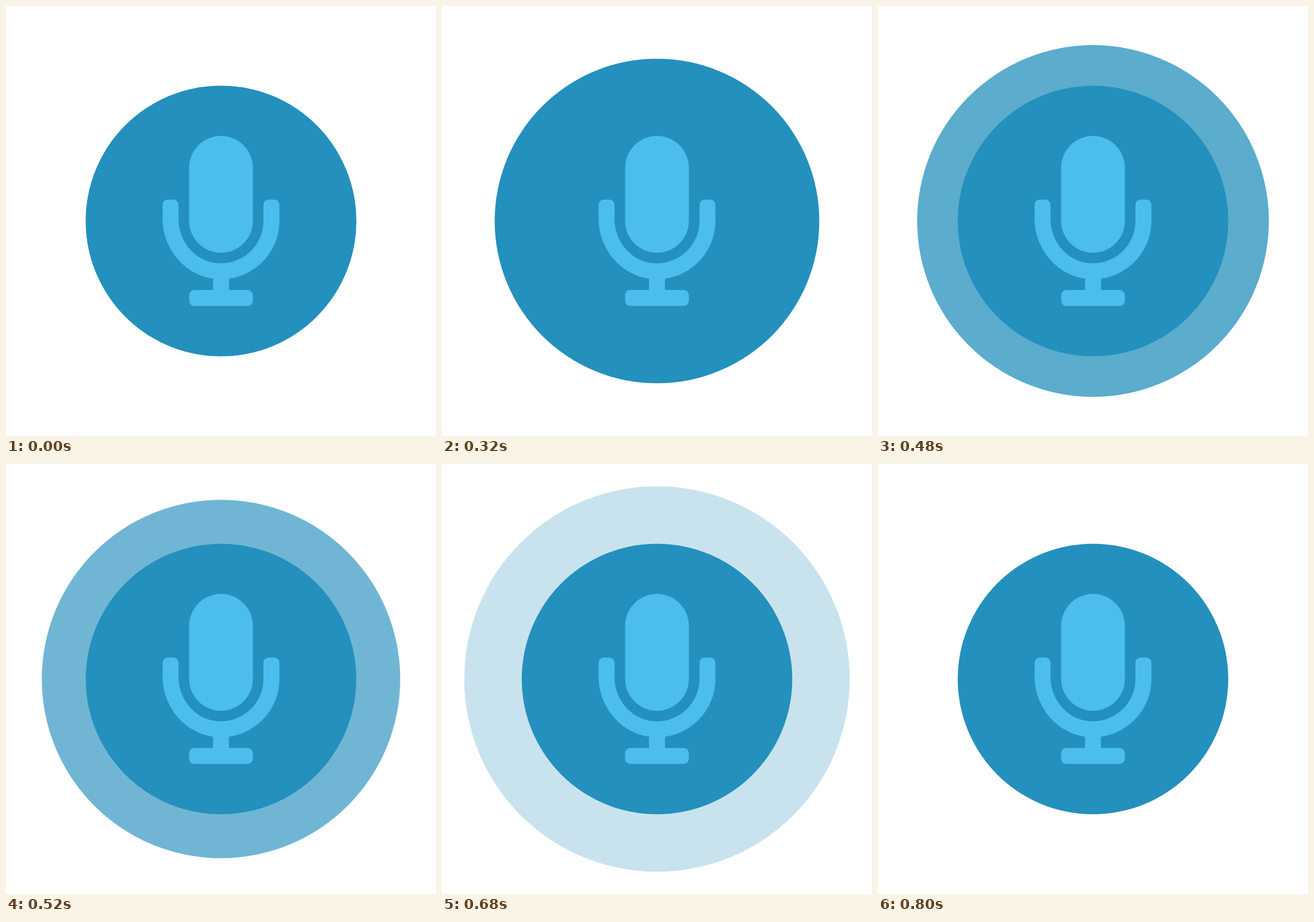
Animation, 748 px wide and 748 px high, one loop 1400 ms. Source, as an HTML page:

```html
<!DOCTYPE html>
<html lang="en">
<head>
<meta charset="utf-8">
<title>Microphone pulse</title>
<style>
  html, body { margin: 0; width: 100%; height: 100%; overflow: hidden; background: #fff; }
  svg { display: block; width: 100%; height: 100%; }
  .disc { fill: #2490bd; }
  .mic { fill: #4bbeee; }
</style>
</head>
<body>
<svg viewBox="0 0 748 748">
  <circle id="pulse" class="disc" cx="374" cy="374" r="235.3"/>
  <circle class="disc" cx="374" cy="374" r="235.3"/>
  <g class="mic" transform="translate(374 373.8) scale(.5775) translate(-176 -256)">
    <rect x="80" width="192" height="352" rx="96"/>
    <!-- cradle, stem and foot -->
    <path d="M336 192h-16c-8.84 0-16 7.16-16 16v48c0 74.8-64.49 134.82-140.79 127.38
             C96.71 376.89 48 317.11 48 250.3V208c0-8.84-7.16-16-16-16H16c-8.84 0-16 7.16-16 16v40.16
             c0 89.64 63.97 169.55 152 181.69V464H96c-8.84 0-16 7.16-16 16v16c0 8.84 7.16 16 16 16h160
             c8.84 0 16-7.16 16-16v-16c0-8.84-7.16-16-16-16h-56v-33.77
             C285.71 418.47 352 344.9 352 256v-48c0-8.84-7.16-16-16-16z"/>
  </g>
</svg>
<script>
  const LOOP = 1400, STEP = 40, END = 800;
  const FADE_START = 380, FADE_TIME = 400;
  const BASE_R = 235.3, GROWTH = 0.14706;
  const pulse = document.getElementById('pulse');

  function draw(now) {
    const t = Math.floor((now % LOOP) / STEP) * STEP;
    const active = t < END;
    const fade = Math.max(0, (t - FADE_START) / FADE_TIME);
    pulse.setAttribute('r', active ? BASE_R + GROWTH * t : BASE_R);
    pulse.setAttribute('opacity', active ? 1 - fade : 0);
  }

  const start = performance.now();
  function tick() {
    draw(performance.now() - start);
    requestAnimationFrame(tick);
  }
  tick();
</script>
</body>
</html>
```
